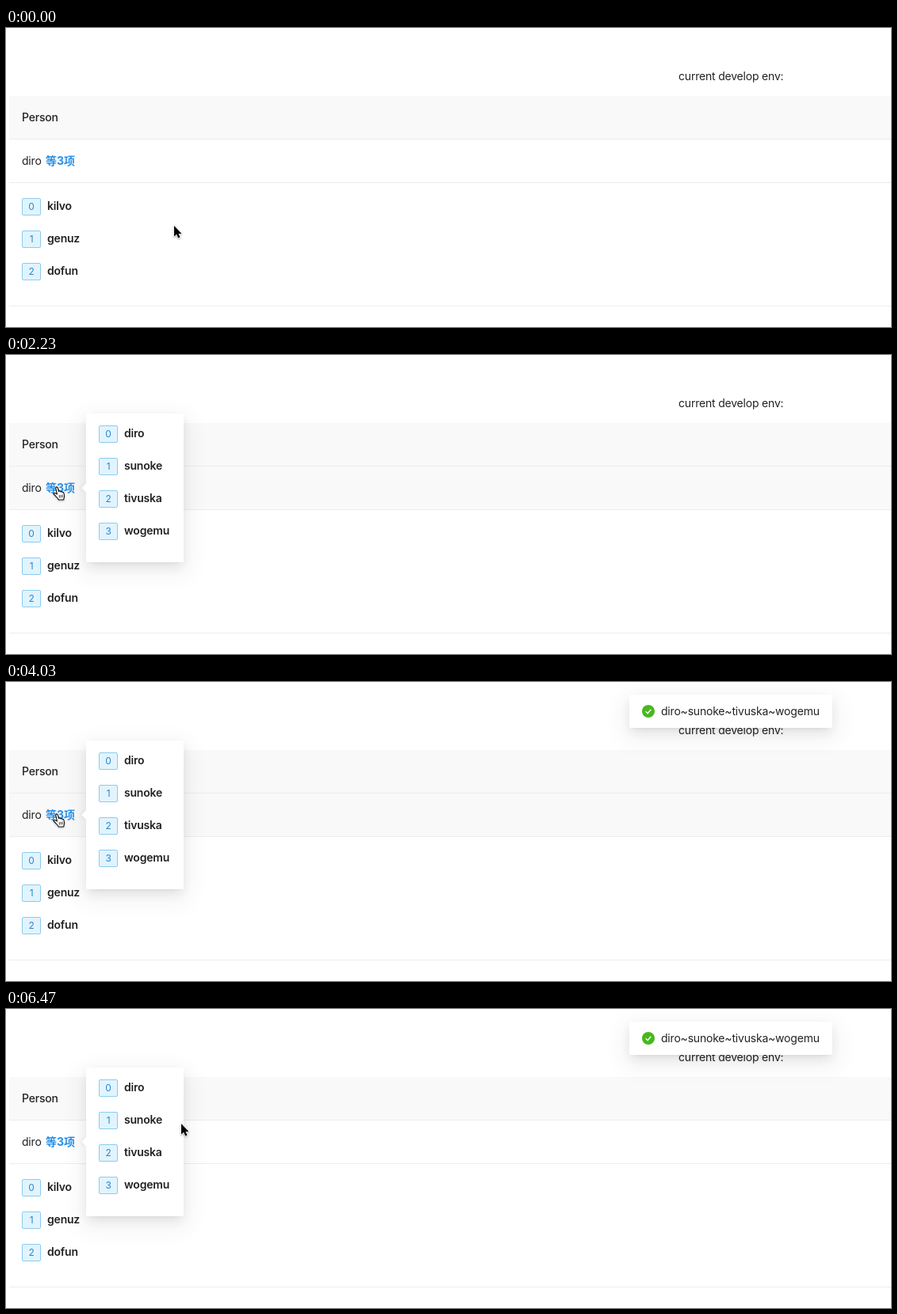
These frames come from a looping animation (1116 px wide and 378 px high, 6.51 s). An HTML page:

```html
<!DOCTYPE html>
<html lang="en">
<head>
<meta charset="utf-8">
<title>Person table</title>
<style>
  html, body { margin: 0; width: 100%; height: 100%; overflow: hidden; background: #fff; }
  body {
    position: relative;
    font: 14px/22px Inter, "Noto Sans CJK SC", "Noto Sans CJK", sans-serif;
    letter-spacing: -.2px;
    color: #222;
  }
  div, svg { position: absolute; box-sizing: border-box; white-space: nowrap; }
  .cell { left: 4px; right: 0; border-bottom: 1px solid #ededed; }
  .tag {
    width: 24px; height: 22px; line-height: 20px; font-size: 12px; text-align: center;
    color: #2a86cc; background: #e1f4fe; border: 1px solid #8accf0; border-radius: 2px;
  }
  .name { font-weight: 600; }
  .card {
    background: #fff; border-radius: 2px;
    box-shadow: 0 3px 6px -4px #0000001f, 0 6px 16px #00000014, 0 9px 28px 8px #0000000d;
  }
  #pop { left: 101px; top: 74px; width: 123px; height: 188px; transform-origin: -5px 94px; }
  #tip {
    left: -4px; top: 90px; width: 8px; height: 8px; background: #fff;
    transform: rotate(45deg); box-shadow: -2px 2px 5px #0000000f;
  }
  #toast { left: 786px; top: 16px; width: 256px; height: 42px; }
  svg { left: 0; top: 0; overflow: visible; }
  b { color: #2a8fe6; }
</style>
</head>
<body>
<div style="left:848px;top:50px">current develop env:</div>
<div class="cell" style="top:86px;height:55px;background:#f9f9f9"></div>
<div class="cell" id="row" style="top:141px;height:55px"></div>
<div class="cell" style="top:196px;height:156px"></div>
<div style="left:20px;top:102px;font-weight:500">Person</div>
<div style="left:20px;top:157px">diro</div>
<div style="left:50px;top:157px;letter-spacing:0"><b>等3项</b></div>
<div id="list" style="left:20px;top:215px"></div>

<div id="pop" class="card">
  <div id="tip"></div>
  <div id="popList" style="left:16px;top:15px"></div>
</div>

<div id="toast" class="card">
  <svg width="42" height="42">
    <circle cx="24" cy="21" r="8" fill="#47b81c"/>
    <path d="M20.7 21.2l2.4 2.5 4.2-5" fill="none" stroke="#fff" stroke-width="1.4"/>
  </svg>
  <div style="left:40px;top:10px" id="toastText"></div>
</div>

<svg id="cursor" width="1" height="1" stroke-linejoin="round">
  <g id="arrow" style="filter:drop-shadow(0 1px 1px #0005)">
    <path d="M0 0V13.6L3.1 10.8 5.2 15.6 7.5 14.6 5.4 9.9H9.5Z" stroke="#fff" stroke-width="1.2" paint-order="stroke"/>
  </g>
  <g id="hand" transform="translate(-5 -1)" stroke="#111" stroke-width="1.1" style="filter:drop-shadow(0 1px 1px #0004)">
    <path fill="#fff" d="M5.5 10L3.9 3Q3.4 1.2 4.7.9 6 .7 6.4 2.3L7.5 6.5Q8 5.6 9.1 6 9.8 6.3 9.9 7 11 6.2 12 7.5 13.2 7 13.9 8.5L14.6 12Q14.6 14 13.6 17H7.4Q6.6 15.2 4.5 13.3 2.5 11 1 9.8.4 8.6 2.2 8.5 3.6 8.8 5.5 10Z"/>
    <path stroke-width=".8" d="M8.2 11l.4 3.5M10.2 10.8l.3 3.6M12.2 10.6l.2 3.6"/>
  </g>
  <g id="beam" fill="none">
    <path id="beamPath" d="M-3-7Q-.8-7 0-6 .8-7 3-7M0-6V6M-3 7Q-.8 7 0 6 .8 7 3 7M-1.6 2.5H1.6" stroke="#fff" stroke-width="2.8"/>
    <use href="#beamPath" style="stroke:#111"/>
  </g>
</svg>

<script>
const LOOP = 6510;
const $ = id => document.getElementById(id);
const guests = ["diro", "sunoke", "tivuska", "wogemu"];

const listHtml = names => names.map((name, i) =>
  `<div class="tag" style="top:${i * 41}px">${i}</div>
   <div class="name" style="left:32px;top:${i * 41 - 1}px">${name}</div>`).join("");

$("list").innerHTML = listHtml(["kilvo", "genuz", "dofun"]);
$("popList").innerHTML = listHtml(guests);
$("toastText").textContent = guests.join("~");

// the beam is drawn twice: a white halo, then a thin dark line
const ink = $("beamPath").cloneNode();
ink.removeAttribute("id");
ink.setAttribute("stroke", "#111");
ink.setAttribute("stroke-width", 1.1);
$("beam").lastElementChild.replaceWith(ink);

// pointer hot spot: time, x, y
const path = [
  [0, 212, 250], [160, 212, 250], [270, 19, 190], [490, 19, 190], [560, 6, 185],
  [700, 44, 178], [850, 71, 164], [1090, 64, 167], [1170, 64, 167], [1200, 62, 166],
  [1970, 62, 166], [2100, 64, 167], [5420, 64, 167], [5670, 154, 142],
  [6030, 174, 139], [6430, 174, 139], [6470, 221, 145], [LOOP, 221, 145]
];

const progress = (t, from, to) => Math.min(1, Math.max(0, (t - from) / (to - from)));
const easeOut = p => 1 - (1 - p) ** 4;

function pointerAt(t) {
  const i = path.findIndex(key => key[0] > t);
  const [t0, x0, y0] = path[i - 1], [t1, x1, y1] = path[i];
  const p = progress(t, t0, t1);
  return [x0 + (x1 - x0) * p, y0 + (y1 - y0) * p];
}

function pointerKind(t) {
  if (t >= 740 && t < 5490) return "hand";
  return t >= 5650 && t < 6440 ? "beam" : "arrow";
}

function draw(t) {
  const hover = progress(t, 1970, 2270) - progress(t, 5520, 5820);
  $("row").style.backgroundColor = `rgba(249,249,249,${hover})`;

  const open = easeOut(progress(t, 2070, 2270));
  $("pop").style.opacity = open;
  $("pop").style.transform = `scale(${.8 + .2 * open})`;

  const shown = easeOut(progress(t, 3450, 3750));
  $("toast").style.opacity = shown;
  $("toast").style.transform = `translateY(${58 * (shown - 1)}px)`;

  const [x, y] = pointerAt(t), kind = pointerKind(t);
  $("cursor").style.transform = `translate(${x}px,${y}px)`;
  for (const id of ["arrow", "hand", "beam"]) $(id).style.display = id === kind ? "" : "none";
}

const start = performance.now();
function tick() {
  draw((performance.now() - start) % LOOP);
  requestAnimationFrame(tick);
}
tick();
</script>
</body>
</html>
```
